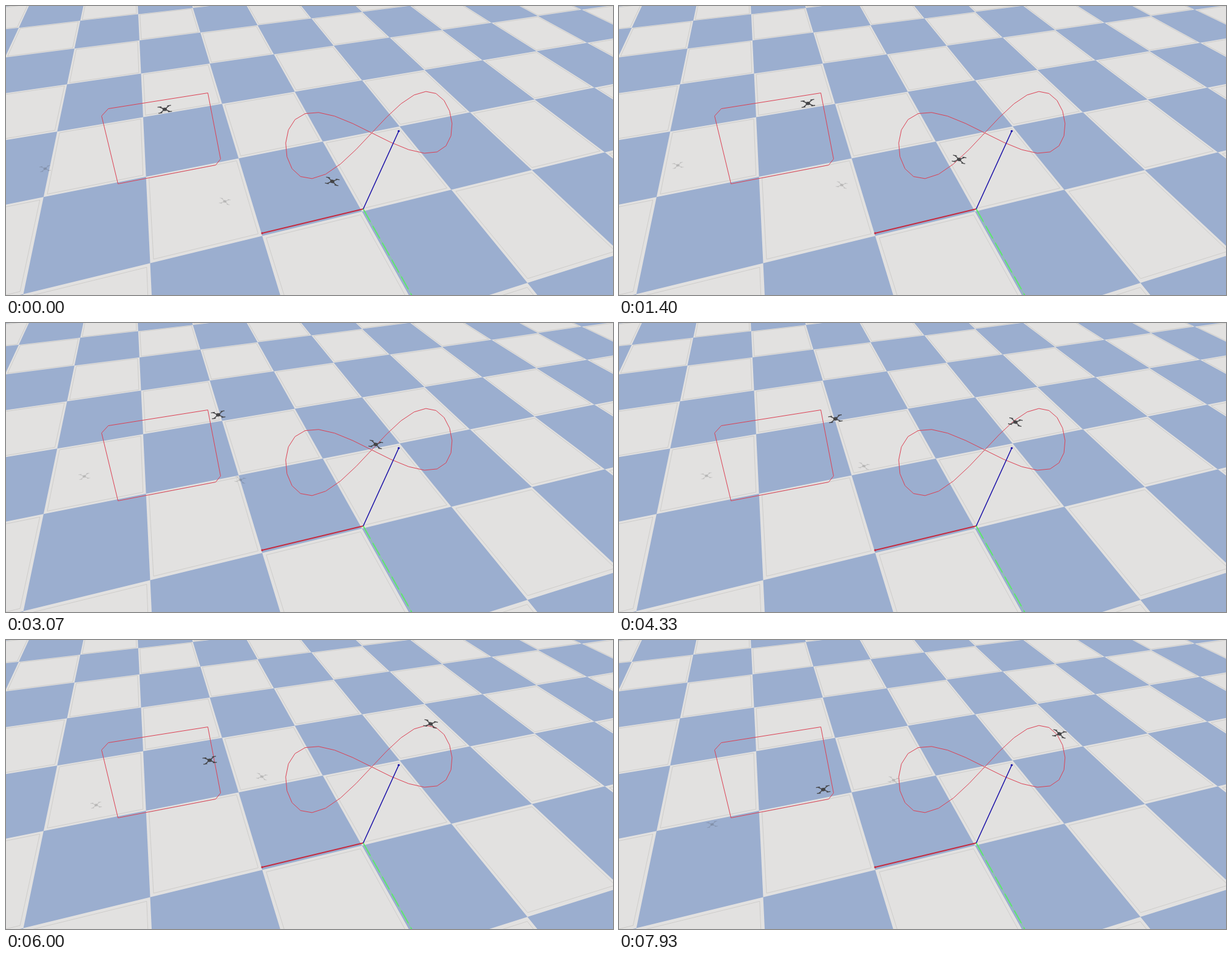
These frames come from a looping animation (1000 px wide and 477 px high, 8 s). An HTML page with a canvas:

```html
<!DOCTYPE html>
<html lang="en">
<head>
<meta charset="utf-8">
<title>Two drones on a checkered floor</title>
<style>
  html, body { margin: 0; width: 100%; height: 100%; overflow: hidden; background: #e2e1e0; }
  canvas { display: block; width: 100vw; height: 100vh; }
</style>
</head>
<body>
<canvas id="stage" width="1000" height="477"></canvas>
<script>
const ctx = document.getElementById('stage').getContext('2d');
ctx.translate(0.5, 0.5);
const LOOP = 8000, STEP = 1000 / 15;

function polyline(points, closed) {
  const path = new Path2D();
  points.forEach(([x, y]) => path.lineTo(x, y));
  if (closed) path.closePath();
  return path;
}

function stroke(path, color, width) {
  ctx.strokeStyle = color;
  ctx.lineWidth = width;
  ctx.stroke(path);
}

// Perspective view of the floor; tiles are one unit wide.
function floorPoint(u, v) {
  const s = (u + 2) / 5, t = v / 3;
  const w = 1 + 0.3083 * s + 0.67667 * t;
  return [(237 + 1053 * s + 135.22 * t) / w, (424 - 108.7 * s - 237.89 * t) / w];
}

function tile(u, v, inset) {
  const a = inset, b = 1 - inset;
  return polyline([[a, a], [b, a], [b, b], [a, b]].map(([x, y]) => floorPoint(u + x, v + y)), true);
}

function drawFloor() {
  ctx.fillStyle = '#e2e1e0';
  ctx.fillRect(-1, -1, 1002, 479);
  ctx.fillStyle = '#9baecf';
  for (let u = -6; u < 12; u++) {
    for (let v = -2; v < 8; v++) {
      if ((u + v) % 2) ctx.fill(tile(u, v, 0));
      else stroke(tile(u, v, 0.03), '#c4c3c0', 0.7);
    }
  }
}

// Figure eight: a 1:2 Lissajous curve seen in perspective.
function eightPoint(angle) {
  const a = Math.sin(angle), b = Math.sin(2 * angle);
  const w = 1 + 0.0385 * a + 0.02 * b;
  return [(602 + 159.2 * a + 4.5 * b) / w, (209 - 18.9 * a - 47.8 * b) / w];
}

const SEGMENTS = 30;
const eightTrack = polyline(
  Array.from({ length: SEGMENTS }, (_, i) => eightPoint(2 * Math.PI * i / SEGMENTS)), true);
const squareTrack = polyline([[157, 181], [168, 169], [332, 143], [353, 252], [345, 262], [184, 293]], true);

function drawAxis(from, to, color, width, dot) {
  stroke(polyline([from, to]), color, width);
  if (!dot) return;
  ctx.fillStyle = color;
  ctx.beginPath();
  ctx.arc(...to, 1.7, 0, 7);
  ctx.fill();
}

function drawAxes() {
  const origin = [588, 334.5];
  drawAxis(origin, [421.5, 374.5], '#c42b40', 1.8, true);
  drawAxis(origin, [668, 477], '#7fdc8c', 1);
  ctx.setLineDash([24, 8]);
  drawAxis(origin, [668, 477], '#5ce86c', 2);
  ctx.setLineDash([]);
  drawAxis(origin, [646.5, 206], '#160ca6', 1.5, true);
}

const droneArms = new Path2D(), droneRotors = new Path2D(), droneBody = new Path2D();
for (const x of [-8, 8]) {
  for (const y of [-5, 5]) {
    droneArms.moveTo(0, 0);
    droneArms.lineTo(x, y);
    droneRotors.moveTo(x - 3.2, y);
    droneRotors.lineTo(x + 3.2, y);
  }
}
droneBody.ellipse(0, 0, 3.6, 2.8, 0, 0, 7);

function drawDrone([x, y], angle, scale, color, alpha) {
  ctx.save();
  ctx.translate(x, y);
  ctx.rotate(angle);
  ctx.scale(scale, scale);
  ctx.globalAlpha = alpha;
  stroke(droneArms, color, 1.4);
  stroke(droneRotors, color, 1.3);
  ctx.fillStyle = color;
  ctx.fill(droneBody);
  ctx.restore();
}

// Key points are evenly spaced in time.
const flights = [
  {
    angle: -0.15,
    drone: [[261, 170], [328, 157], [357, 153], [335, 198], [336, 248]],
    shadow: [[64, 268], [109, 260], [141, 250], [148, 272], [153, 305]]
  },
  {
    angle: 0.2,
    drone: [[537, 289], [573, 236], [642, 171], [699, 138], [726, 155]],
    shadow: [[360, 322], [371, 283], [399, 240], [421, 225], [453, 231]]
  }
];

// Catmull-Rom curve through the key points; progress runs from 0 to 1.
function along(keys, progress) {
  const last = keys.length - 1;
  const i = Math.min(last - 1, Math.floor(progress * last));
  const p = progress * last - i, q = 1 - p;
  const slope = (k, axis) => {
    const a = Math.max(0, k - 1), b = Math.min(last, k + 1);
    return (keys[b][axis] - keys[a][axis]) / (b - a);
  };
  return [0, 1].map(axis =>
    keys[i][axis] * (1 + 2 * p) * q * q + keys[i + 1][axis] * p * p * (3 - 2 * p) +
    slope(i, axis) * p * q * q - slope(i + 1, axis) * p * p * q);
}

function draw(elapsed) {
  const progress = Math.floor(elapsed % LOOP / STEP + 0.1) * STEP / LOOP;
  drawFloor();
  for (const f of flights) drawDrone(along(f.shadow, progress), f.angle, 0.8, '#333', 0.15);
  stroke(squareTrack, '#dc3f52', 1);
  stroke(eightTrack, '#dc3f52', 1);
  drawAxes();
  for (const f of flights) drawDrone(along(f.drone, progress), f.angle, 1, '#444446', 1);
}

const start = performance.now();
function tick() {
  draw(performance.now() - start);
  requestAnimationFrame(tick);
}
tick();
</script>
</body>
</html>
```
